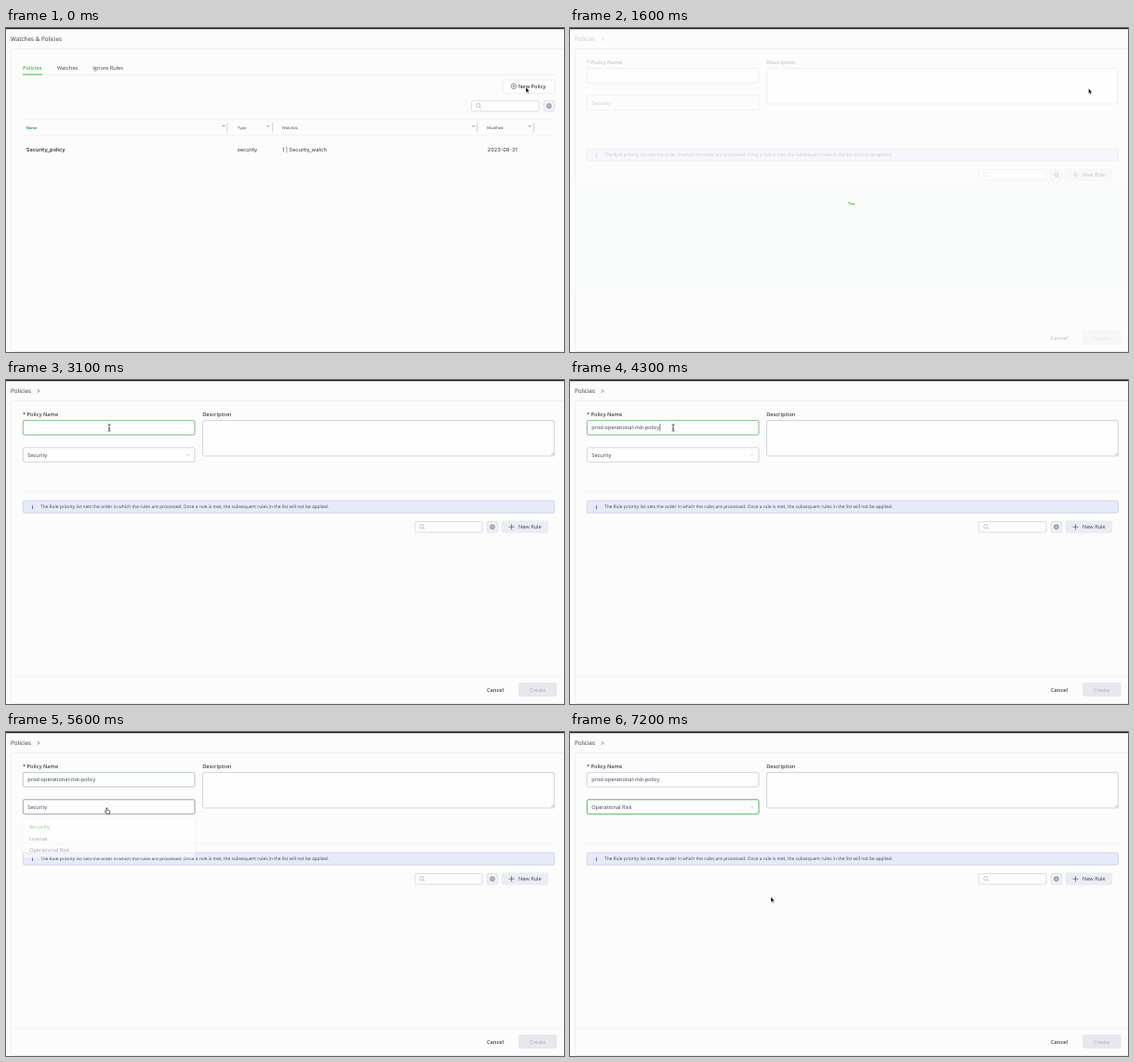
An HTML page for the animation above (7300 ms loop, 600 by 349 pixels).

```html
<!DOCTYPE html>
<html lang="en">
<head>
<meta charset="utf-8">
<title>Create a policy</title>
<style>
  html, body { margin: 0; width: 100%; height: 100%; overflow: hidden; background: #fcfcfd; }
  svg { display: block; width: 600px; height: 349px; }
  text { font: 5.65px "Open Sans", sans-serif; fill: #3d4351; text-rendering: geometricPrecision; white-space: pre; }
  .title { font-size: 6.35px; fill: #2f3440; }
  .strong { font-weight: 600; }
  .medium { font-weight: 500; }
  .cell { font-family: Inter, sans-serif; font-size: 5.65px; fill: #30343f; }
  .head { font-family: Inter, sans-serif; font-size: 4.1px; font-weight: 500; fill: #5d6475; }
  .note { font-size: 4.84px; }
  .green { fill: #40be46; }
  .line { fill: none; stroke: #e4e6ec; stroke-width: .6; }
  .card { fill: #fcfcfc; stroke: #e9ebef; stroke-width: .7; }
  .box { fill: #fdfdfd; stroke: #b7bbc6; stroke-width: .6; }
  .search { fill: #fdfdfe; stroke: #c6cbdc; stroke-width: .6; }
  .icon { fill: none; stroke: #4b5263; stroke-width: .6; }
  .hover { fill: none; stroke: #858b9b; stroke-width: .6; }
  .focus { fill: none; stroke: #5cb961; stroke-width: .6; }
  .soft { filter: drop-shadow(0 .6px 1.2px #2a30502e); }
</style>
</head>
<body>
<svg viewBox="0 0 600 349">
  <defs>
    <g id="search">
      <rect class="search" width="72.5" height="11.5" rx="1.5"/>
      <g fill="none" stroke="#9ba2b8" stroke-width=".6">
        <circle cx="7.2" cy="5.2" r="2.1"/><path d="M8.7 6.7l1.7 1.8"/>
      </g>
    </g>
    <g id="gear">
      <rect width="11.5" height="11.5" rx="1.5" fill="#eff0f6" stroke="#d2d6e2" stroke-width=".6"/>
      <circle cx="5.75" cy="5.75" r="2.2" fill="none" stroke="#555d72" stroke-width=".9"/>
      <circle cx="5.75" cy="5.75" r=".7" fill="#555d72"/>
    </g>
    <path id="chevron" d="M-1.5-.7L0 .8 1.5-.7" class="icon"/>
    <path id="tick" d="M0 0v10.5" stroke="#b3b8c4" stroke-width=".6"/>
  </defs>

  <rect width="600" height="349" fill="#fcfcfd"/>
  <rect class="card" x="5.3" y="22.5" width="610" height="326" rx="2"/>

  <g id="list">
    <text class="title" x="5" y="13.7">Watches &amp; Policies</text>
    <text class="strong green" x="18" y="44.5">Policies</text>
    <text x="55" y="44.5">Watches</text>
    <text x="93.3" y="44.5">Ignore Rules</text>
    <path class="line" d="M18 50.4H590"/>
    <path d="M18 50.1h21" stroke="#40be46"/>

    <rect class="soft" x="534.7" y="56.4" width="54.8" height="13.4" rx="2" fill="#fff"/>
    <rect id="newHover" class="focus" x="534.7" y="56.4" width="54.8" height="13.4" rx="2"/>
    <g class="icon"><circle cx="546" cy="62.8" r="2.8"/><path d="M544.5 62.8h3M546 61.3v3"/></g>
    <text class="strong" x="550.9" y="64.9">New Policy</text>
    <use href="#search" x="500.6" y="78.2"/>
    <use href="#gear" x="578.2" y="78.2"/>

    <path class="line" d="M18 98.6H590M18 115.4H590" opacity=".6"/>
    <text class="head" style="font-weight:600;fill:#2f8f55" x="21.7" y="108.6">Name</text>
    <text class="head" x="248.8" y="108.6">Type</text>
    <text class="head" x="296.8" y="108.6">Watches</text>
    <text class="head" x="517.3" y="108.6">Modified</text>
    <use href="#chevron" transform="translate(234 105.6) scale(1 -1)"/>
    <use href="#chevron" x="282" y="105.6"/>
    <use href="#chevron" x="502.6" y="105.6"/>
    <use href="#chevron" x="563.2" y="105.6"/>
    <use href="#tick" x="237.8" y="102"/>
    <use href="#tick" x="286.6" y="102"/>
    <use href="#tick" x="506.7" y="102"/>
    <use href="#tick" x="567.5" y="102"/>
    <text class="cell strong" x="21.8" y="132.6">Security_policy</text>
    <text class="cell" x="248.8" y="132.6">security</text>
    <text class="cell" x="297" y="132.6">1 | Security_watch</text>
    <text class="cell" x="517.8" y="132.6">2023-08-31</text>
  </g>

  <g id="form">
    <text class="title" x="5" y="13.9">Policies</text>
    <path class="icon" d="M34 10.2l1.7 1.7-1.7 1.7" style="stroke-width:.8"/>
    <text class="strong" x="18" y="39.4">* Policy Name</text>
    <text class="strong" x="211.2" y="39.4">Description</text>

    <rect class="box" x="18.3" y="43.6" width="184.7" height="15.5" rx="1.5"/>
    <rect id="nameHover" class="hover" x="18.3" y="43.6" width="184.7" height="15.5" rx="1.5"/>
    <rect id="nameFocus" class="focus" x="18.3" y="43.6" width="184.7" height="15.5" rx="1.5"/>
    <text id="nameText" x="23.3" y="53.3">prod-operational-risk-policy</text>
    <rect id="caret" y="47.2" width=".6" height="8" fill="#222"/>

    <rect class="box" x="211.5" y="43.5" width="378" height="38.4" rx="1.5"/>
    <path class="icon" d="M586.3 81l2.4-2.4M587.8 81l1-1" style="stroke-width:.4"/>

    <rect class="box" x="18.3" y="72.8" width="184.7" height="15.5" rx="1.5"/>
    <rect id="typeHover" class="hover" x="18.3" y="72.8" width="184.7" height="15.5" rx="1.5"/>
    <rect id="typeFocus" class="focus" style="stroke:#40be46;stroke-width:.8" x="18.3" y="72.8" width="184.7" height="15.5" rx="1.5"/>
    <text id="typeText" x="23.3" y="82.6">Security</text>
    <g id="arrow" opacity=".45"><use href="#chevron"/></g>

    <path class="line" d="M18 119.7H590" opacity=".8"/>
    <rect x="18.3" y="130" width="571.2" height="13.2" rx="1.5" fill="#e7eaf9" stroke="#bbc2e6" stroke-width=".6"/>
    <text class="strong" style="font-weight:700;fill:#3350c4" x="27.5" y="138.7">i</text>
    <text class="note" x="37" y="138.4">The Rule priority list sets the order in which the rules are processed. Once a rule is met, the subsequent rules in the list will not be applied.</text>
    <use href="#search" x="439.7" y="152.5"/>
    <use href="#gear" x="517.2" y="152.5"/>
    <rect x="532.5" y="151.4" width="50.7" height="13.6" rx="2" fill="#ebedf4"/>
    <path class="icon" d="M540.6 158.2h6M543.6 155.2v6" style="stroke-width:.7"/>
    <text class="medium" x="551" y="160.2">New Rule</text>
    <path class="line" d="M5.5 319.3H600" opacity=".7"/>
    <text class="strong" x="517" y="335.8">Cancel</text>
    <rect x="551" y="326" width="41.5" height="15" rx="2" fill="#e6e8ee"/>
    <text class="medium" style="fill:#a4abc0" x="563" y="335.8">Create</text>

    <g id="menu">
      <rect class="soft" x="18.3" y="94" width="185" height="46.5" rx="1.5" fill="#fff"/>
      <rect id="option" x="18.3" width="185" height="13.8" fill="#f0f2f6"/>
      <text class="strong green" x="25" y="105.3">Security</text>
      <text x="25" y="119">License</text>
      <text x="25" y="132.8">Operational Risk</text>
    </g>
  </g>

  <rect id="shade" x="5.6" y="165" width="595" height="118" fill="#fafbfb"/>
  <path id="spinner" d="M299.2 187.8A7 7 0 0 0 305.8 189.8" fill="none" stroke="#40be46" stroke-linecap="round"/>
  <rect width="600" height="1.2" fill="#1c1e2b"/>

  <g id="cursor">
    <path id="pointer" d="M0 0v5.8l1.3-1.1.9 2 .9-.4-.9-1.9h1.7z" fill="#000" stroke="#fff" stroke-width=".4"/>
    <path id="hand" d="M-.6.7Q0-.2.6.7V2.9L2.8 3.4Q3.7 3.7 3.5 4.7L3 6.9H-.2L-2 4.4Q-1.8 3.5-.6 4.3Z" fill="#fff" stroke="#222" stroke-width=".7" stroke-linejoin="round"/>
    <path id="beam" d="M-1.5-3.7Q0-3.7 0-2.8 0-3.7 1.5-3.7M0-3V3M-1.5 3.7Q0 3.7 0 2.8 0 3.7 1.5 3.7M-.8.9H.8" fill="none" stroke="#222" stroke-width=".7"/>
  </g>
</svg>
<script>
const LOOP = 7300, STEP = 100;
const el = Object.fromEntries([...document.querySelectorAll("svg > [id], svg > g [id]")].map(e => [e.id, e]));

// [time, x, y]
const path = [
  [600, 559, 63.7], [1000, 557.6, 65], [1600, 557.6, 65], [2100, 138, 56],
  [2200, 138, 56], [2400, 111, 51.4], [5000, 111, 51.4], [5300, 108.3, 81.2],
  [5800, 108.3, 81.2], [6300, 80.3, 132.5], [6900, 80.3, 132.5], [7200, 216, 177.6]
];

const ramp = (t, from, to) => Math.min(1, Math.max(0, (t - from) / (to - from)));
const ease = k => k * k * (3 - 2 * k);
const within = (t, from, to) => t >= from && t < to;
const fade = (e, value) => e.setAttribute("opacity", value);
const show = (e, on) => e.setAttribute("visibility", on ? "inherit" : "hidden");

function position(t) {
  let [, x, y] = path[0];
  for (let i = 1; i < path.length; i++) {
    const [from, x0, y0] = path[i - 1], [to, x1, y1] = path[i];
    const k = ease(ramp(t, from, to));
    x += (x1 - x0) * k;
    y += (y1 - y0) * k;
  }
  return [x, y];
}

function render(t) {
  const onForm = t >= 1400;
  show(el.list, !onForm);
  show(el.form, onForm);
  fade(el.newHover, ramp(t, 600, 900));
  fade(el.form, .2 + .08 * ramp(t, 1400, 1600) + .72 * ramp(t, 1600, 1900));

  const loading = within(t, 1400, 1800);
  show(el.shade, loading);
  show(el.spinner, loading);
  el.spinner.setAttribute("transform", `rotate(${(t - 1600) * .3} 304 183.3)`);

  // name field
  const typed = t >= 4300;
  show(el.nameHover, within(t, 2000, 2700));
  fade(el.nameFocus, ramp(t, 2500, 2800) * (1 - ramp(t, 5400, 5700)));
  show(el.nameText, typed);
  el.caret.setAttribute("x", typed ? 96.6 : 23.3);
  const since = t - (typed ? 4300 : 2600);
  show(el.caret, within(t, 2600, 5500) && since % 1000 < 500);

  // type field and its menu
  const opened = ramp(t, 5400, 5800) * (1 - ramp(t, 6400, 6700));
  const stretch = .8 + .2 * opened;
  show(el.typeHover, within(t, 5200, 5900));
  fade(el.typeFocus, ramp(t, 6400, 6700));
  el.typeText.textContent = t >= 6500 ? "Operational Risk" : "Security";
  el.arrow.setAttribute("transform", `translate(195.5 80.6) scale(1 ${1 - 2 * opened})`);
  show(el.menu, opened > 0);
  fade(el.menu, opened);
  el.menu.setAttribute("transform", `translate(0 ${94 * (1 - stretch)}) scale(1 ${stretch})`);

  const [x, y] = position(t);
  show(el.option, y > 96);
  el.option.setAttribute("y", y > 124 ? 124 : y > 110 ? 110.2 : 96.4);

  el.cursor.setAttribute("transform", `translate(${x} ${y})`);
  const hand = within(t, 700, 1400) || within(t, 5200, 6700);
  const beam = within(t, 2000, 5200);
  show(el.hand, hand);
  show(el.beam, beam);
  show(el.pointer, !hand && !beam);
}

const start = performance.now();
function tick() {
  const t = (performance.now() - start) % LOOP;
  render(Math.floor(t / STEP) * STEP);
  requestAnimationFrame(tick);
}
tick();
</script>
</body>
</html>
```
